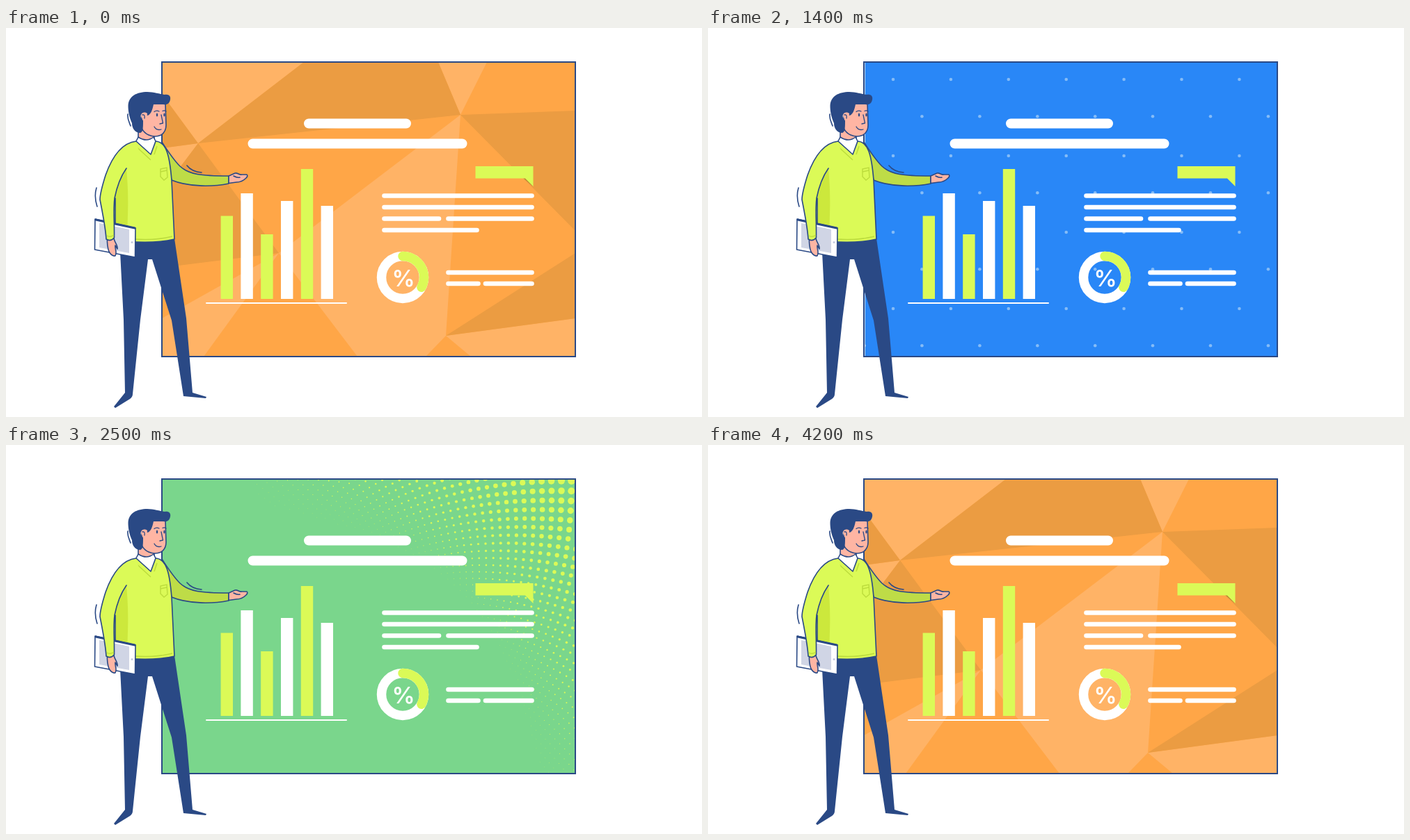
An HTML page for the animation above (4300 ms loop, 1000 px wide and 560 px high).

```html
<!DOCTYPE html>
<html lang="en">
<head>
<meta charset="utf-8">
<title>Presentation</title>
<style>
html, body { margin: 0; width: 100%; height: 100%; overflow: hidden; background: #fff; }
svg { display: block; width: 1000px; height: 560px; }
.pct { font: 600 33px Inter, "Open Sans", sans-serif; text-anchor: middle; fill: #fff; }
.line { fill: none; stroke: #2a4985; stroke-width: 1.6; stroke-linecap: round; stroke-linejoin: round; }
.shape { stroke: #2a4985; stroke-width: 1.6; stroke-linejoin: round; }
.navy { fill: #2a4985; }
.lime { fill: #dbfa57; }
.skin { fill: #ffb5a3; }
.fold { fill: none; stroke: #bcdc3c; stroke-width: 1.4; }
.cloud { fill: #ebccff; }
.light { fill: #ffb366; }
.dark { fill: #eb9c42; }
.wire { fill: none; stroke: #80ffff; stroke-width: 2.4; }
.edge { fill: none; stroke: #fff; stroke-opacity: .7; }
.rule { fill: none; stroke: #fff; stroke-linecap: round; }
</style>
</head>
<body>
<svg viewBox="0 0 1000 560">
  <defs>
    <clipPath id="board"><rect x="224" y="49" width="594" height="424"/></clipPath>
    <clipPath id="panel"><rect x="225" y="49" width="593" height="424"/></clipPath>
  </defs>

  <g clip-path="url(#board)">
    <g id="orange">
      <rect x="224" y="49" width="594" height="424" fill="#ffa647"/>
      <path class="light" d="M224 49H428L276 166L224 95ZM276 166L224 173V235ZM621 49H691L653 125Z
        M392 324L224 418V473H284ZM392 324L505 473H603L632 443L653 125ZM632 443L818 418V473H668Z"/>
      <path class="dark" d="M224 95L276 166L224 173ZM276 166L224 235V345L392 324ZM428 49H621L653 125L276 166Z
        M653 125L818 119V292ZM632 443L818 324V418Z"/>
      <path d="M743 216L757 228L748 214Z" fill="#b98a35"/>
    </g>

    <g id="purple" clip-path="url(#panel)">
      <rect x="225" y="49" width="593" height="424" fill="#d399ff"/>
      <g id="clouds" class="cloud">
        <path d="M225 49H430L408 90L370 100L318 100L265 100L232 95V83H225Z"/>
        <path d="M225 360H250L290 380L330 398L357 408Q372 414 388 410L440 408L490 395L530 408L565 405L610 380H818V473H225Z"/>
      </g>
      <path class="edge" d="M225 50.500H818"/>
    </g>

    <g id="blue" clip-path="url(#panel)">
      <rect x="225" y="49" width="593" height="424" fill="#2987f7"/>
      <g id="grid" fill="#85bcf7"></g>
      <path class="edge" d="M225.500 49V473"/>
    </g>

    <g id="green" clip-path="url(#panel)">
      <rect x="225" y="49" width="593" height="424" fill="#7ad68c"/>
      <g id="halftone" class="lime"></g>
    </g>

    <g id="cyan" clip-path="url(#panel)">
      <rect x="225" y="49" width="593" height="424" fill="#66deeb"/>
      <g id="circuit" class="wire"></g>
    </g>
  </g>

  <rect x="224" y="49" width="594" height="424" fill="none" stroke="#2a4985" stroke-width="2"/>

  <g id="chart"></g>
  <path class="rule" stroke-width="2" d="M288 396H489"/>
  <path class="rule" stroke-width="14" d="M435 137.500H575M354.500 166.500H655.500"/>
  <path class="rule" stroke-width="6.600" d="M543.500 241.500H755.500M543.500 258H755.500M543.500 274.500H622M635.500 274.500H755.500
    M543.500 291H676.500M635.500 352H755.500M635.500 368H678.500M689 368H755.500"/>
  <path class="lime" d="M674.500 199H757.500V228L746 216.500H674.500Z"/>
  <circle cx="570" cy="359" r="30.500" fill="none" stroke="#fff" stroke-width="13.500"/>
  <path d="M570 328.500A30.500 30.500 0 0 1 597 373.200" fill="none" stroke="#dbfa57" stroke-width="13.500" stroke-linecap="round"/>
  <text class="pct" x="571" y="371.500">%</text>

  <g id="man">
    <path class="navy" d="M163 303C185 310 220 310 242 303L259 418L268 525L288 531L287 533L255 530L238 421L210 333H204L193 420L182 527Q182 531 178 534L157 547L155 545L171 525L169 420Z"/>
    <path class="shape" fill="#bedc47" d="M224 164C233 178 240 189 250 199C263 211 280 213 320 213V224C300 228 265 230 238 219Z"/>
    <path class="shape skin" d="M320 213L329 209C333 208 335 212 339 211L346 211Q348 213 345 216C341 220 337 222 331 222L320 223.500Z"/>
    <path class="line" d="M327 213Q332 216 336 215M260 198Q267 207 281 208"/>

    <path class="lime" d="M187 163C170 165 160 175 154 205L157 303C180 310 215 310 242 304L238 219C236 185 232 164 214 163Z"/>
    <path d="M173 203L157 235V303L175 306C173 280 178 255 173 203Z" fill="#cce83c"/>
    <path class="line" d="M214 163C230 163 235 182 238 219L242 304C215 310 180 310 158 303"/>
    <path class="fold" d="M183 167L208 190M217 170L213 182M222 203L231 201L232 215L227 219L222 214ZM222 207L231 205M186 304Q215 306 239 300"/>

    <path class="shape" fill="#fff" d="M128 275L186 288L185.500 330L127.500 319Z"/>
    <path d="M134 281L177 290V324L134 316Z" fill="#d0d5e5"/>
    <path class="line" style="stroke-width:3" d="M129 276L185 288"/>
    <circle cx="181" cy="308.500" r="1.500" fill="#c5cbe0"/>
    <path class="shape skin" d="M145.500 303L155 303C156 309 161 313 160 318L157 313C156 318 160 322 157 328Q152 329 148 322Q145 314 145.500 303Z"/>
    <path class="lime" d="M187 163C162 166 149 195 143 212C138 228 135 240 135 247C139 268 143 287 144 304Q150 308 155.500 302C156 280 154 262 156 245C160 225 166 212 173 202L192 180Z"/>
    <path class="line" d="M187 163C162 166 149 195 143 212C138 228 135 240 135 247C139 268 143 287 144 304Q150 308 155.500 302C156 280 154 262 156 245C160 225 166 212 173 202M157 245V282"/>
    <path class="fold" d="M145 299Q150 302 155 298"/>
    <path class="line" d="M130 230C127 240 128 248 131 257M175 124C174 131 177 135 179 141"/>

    <path class="shape skin" d="M190 145L190 159Q200 166 213 159L213 152Z"/>
    <path class="shape" fill="#fff" d="M190 157L187 163L208 182L215 163L212 157Q202 165 190 157Z"/>
    <path class="shape skin" d="M210 108H229L230 140Q230 149 223 154Q214 158 205 154Q198 151 195 144L195 122Z"/>
    <path class="navy" d="M193 151C186 151 181 145 181 137C177 128 175.500 120 175.500 112C176 98 188 92 203 92C212 92 221 95 228 96C234 95 237 98 236 103C235 109 231 111 226 110L212 110C210 119 208 125 203 126L197 122C192 123 193 131 197 133C197 143 197 150 193 151Z"/>
    <path class="skin" d="M203 123C197 119 192 124 195 129Q197 133 202 132Z"/>
    <path class="line" style="stroke-width:1.300" d="M213 120.500Q216 118 220 120M225 119.500Q228 118 230 120M223 125L225.500 137L221 138M213 142Q216 148 223 146M196 125Q200 124 199 130"/>
    <ellipse class="navy" cx="217" cy="125" rx="1.200" ry="2.500"/>
    <ellipse class="navy" cx="227.500" cy="125" rx="1.200" ry="2.500"/>
  </g>
</svg>

<script>
const $ = id => document.getElementById(id);
const add = (id, markup) => $(id).insertAdjacentHTML('beforeend', markup);
const dot = (x, y, r) => `<circle cx="${x.toFixed(1)}" cy="${y.toFixed(1)}" r="${r.toFixed(2)}"/>`;

// Bar chart: the even bars are lime
[270.5, 238, 297, 249, 203, 256].forEach((y, i) => add('chart',
  `<rect x="${308.6 + i * 28.8}" y="${y}" width="17.4" height="${390 - y}" fill="${i % 2 ? '#fff' : '#dbfa57'}"/>`));

// Clouds: upper bumps, a small puff, then the bank along the bottom
const puff = (...circle) => add('clouds', dot(...circle));
puff(400, 45, 37);
for (let i = 0; i < 4; i++) puff(267 + i * 48, i % 2 ? 82 : 97, 33 - i * 1.5);
for (let i = 0; i < 6; i++) {
  const a = i * Math.PI / 3;
  puff(295.5 + 21 * Math.cos(a), 173 + 11 * Math.sin(a), 11);
}
[[249, 355, 28], [288, 378, 20], [330, 405, 27], [406, 418, 20], [448, 402, 22],
 [491, 393, 31], [530, 412, 18], [565, 408, 33], [608, 372, 32]].forEach(c => puff(...c));
for (let x = 655; x < 820; x += 55) puff(x, 375, 38);

// Staggered dot grid
for (let row = 0; row < 8; row++)
  for (let col = 0; col < 8; col++)
    add('grid', dot(266 + (col - row % 2 / 2) * 82.9, 74 + row * 55 - row % 2 * 1.8, 2.3));

// Halftone rings: dots swell outwards and fade away from the diagonal
let halftone = '';
for (let k = 0; k < 36; k++) {
  const ring = 290 * 1.0195 ** k;
  for (let n = -45; n < 10; n++) {
    const angle = (n + k % 2 / 2) * 0.039;
    const x = 430 + ring * Math.cos(angle), y = 430 + ring * Math.sin(angle);
    const fade = Math.max(0, Math.cos(1.4 * (angle + Math.PI / 4)));
    const size = 5.5 * ((ring - 290) / 255) ** 1.2 * fade;
    if (size > 0.25 && x < 825 && y > 44) halftone += dot(x, y, size);
  }
}
add('halftone', halftone);

// Circuit wires, each ending in a ring; tiles repeat along the top and,
// turned by half a circle, along the bottom
const wire = (x, y, path) => `<path d="${path}"/>` + dot(x, y, 3.8);
const straight = (x, y, bend = 0) => wire(x, y, `M${x + bend} 49L${x} ${bend ? 58 : 50}V${y - 4}`);
const kinked = (x, y) => wire(x, y, `M${x - 13} 49V${y - 35}L${x} ${y - 23}V${y - 4}`);

let row = '';
for (let x = -23; x < 1000; x += 260.5) {
  const mid = x + 60;
  for (const side of [-1, 1]) row += straight(mid + side * 13.7, 75)
    + straight(mid + side * 24, 100) + straight(mid + side * 60, 103, -side * 5.5);
  row += kinked(x + 171, 118) + kinked(x + 184, 114)
    + straight(x + 187, 75) + straight(x + 197, 100) + straight(x + 233, 103, -6);
}
add('circuit', `<g>${row}</g><g transform="rotate(180 505 261)">${row}</g>`);

for (const mid of [245, 358.5])
  for (const [offset, depth] of [[-60, 47], [-24, 44], [-13.5, 18], [13.5, 18], [24, 44]]) {
    const y = mid + offset;
    add('circuit', wire(225 + depth, y, `M225 ${y}h${depth - 4}`));
    add('circuit', wire(816 - depth, y, `M818 ${y}h${2 - depth}`));
  }

// Each panel slides in over the last one; the final one leaves to the left
const LOOP = 4300, STEP = 100, SLIDE = 500, WIDTH = 593;
const starts = { purple: 0, blue: 803.3, green: 1625.5, cyan: 2606.2 };
const EXIT = 3394.3;

const ease = (t, start) => {
  const u = Math.min(1, Math.max(0, (t - start) / SLIDE));
  return (1 - Math.cos(Math.PI * u)) / 2;
};

function draw(now) {
  const t = Math.floor((now % LOOP) / STEP) * STEP;
  for (const id in starts) {
    let x = WIDTH * (1 - ease(t, starts[id]));
    if (id === 'cyan') x -= WIDTH * ease(t, EXIT);
    else if (t > starts.cyan + SLIDE) x = WIDTH;
    $(id).setAttribute('transform', `translate(${x.toFixed(2)} 0)`);
    $(id).style.display = Math.abs(x) < WIDTH ? '' : 'none';
  }
  requestAnimationFrame(draw);
}
draw(performance.now());
</script>
</body>
</html>
```
